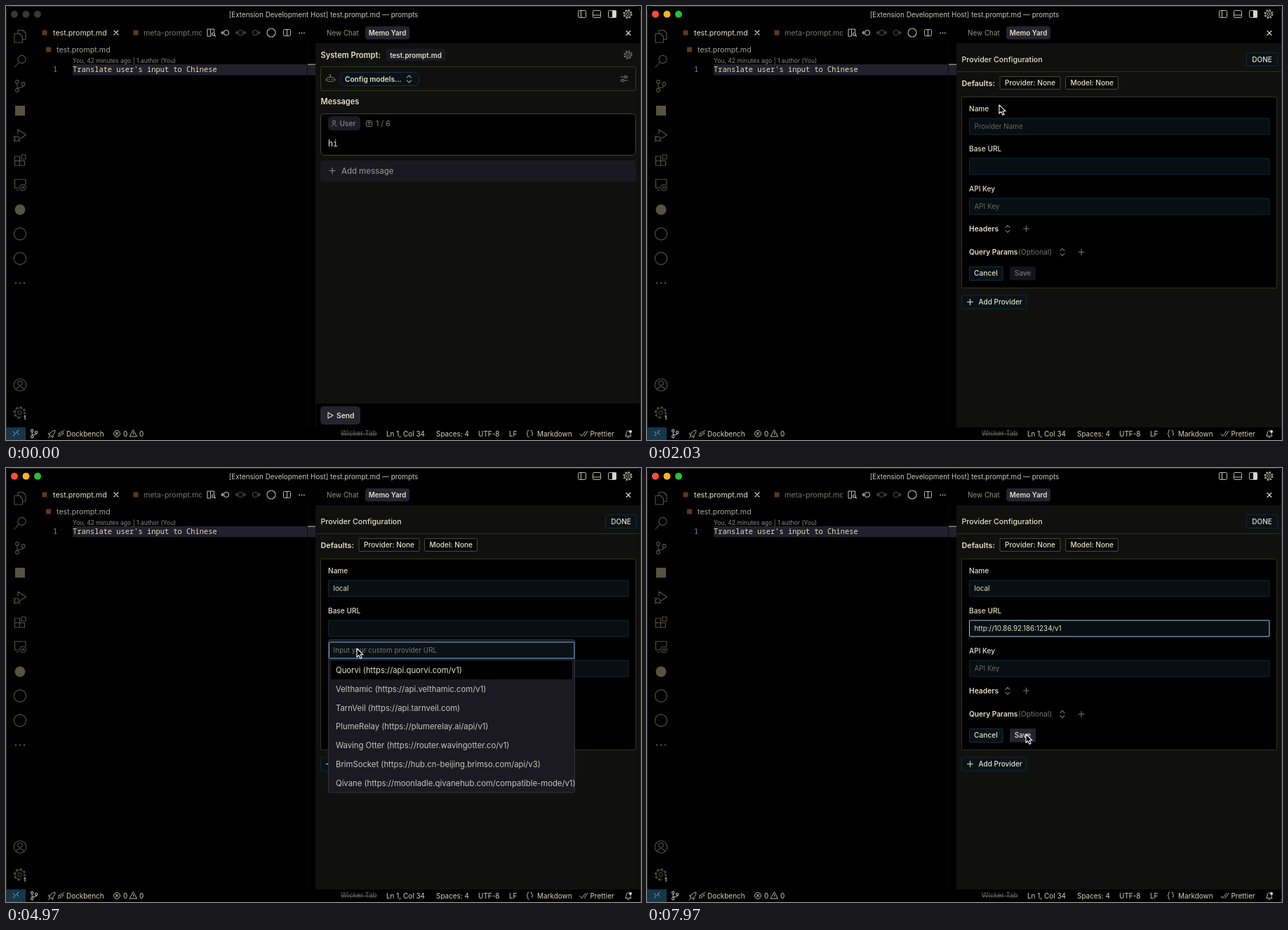
Animation, 905 px wide and 618 px high, one loop 8 s. Source, as an HTML page:

```html
<!DOCTYPE html>
<html lang="en">
<head>
<meta charset="utf-8">
<title>Prompt editor</title>
<style>
  html, body { margin: 0; width: 100%; height: 100%; overflow: hidden; background: #000; }
  svg { display: block; width: 100%; height: 100%; }
  text { font-family: Inter, "Open Sans", sans-serif; white-space: pre; }
  .mono { font-family: "Noto Sans Mono", "DejaVu Sans Mono", monospace; }
</style>
</head>
<body>
<svg id="stage" viewBox="0 0 905 618" xmlns="http://www.w3.org/2000/svg"></svg>
<script>
const LOOP = 8000;
const INK = '#e2e0c4', SOFT = '#b9b8a8', DIM = '#77766b', ICON = '#55543f';
const BLUE = '#6fa8e2', PALE = '#a8c6de', EDGE = '#122936', FIELD = '#070f13', CHIP = '#25242f';

// Drawing helpers; text is placed by the vertical centre of its line.
const text = (x, y, s, size = 10, fill = INK, weight = 400, extra = '') =>
  `<text x="${x}" y="${y + size * 0.36}" font-size="${size}" fill="${fill}" font-weight="${weight}" ${extra}>${s}</text>`;
const mid = (x, y, s, size, fill, weight) => text(x, y, s, size, fill, weight, 'text-anchor="middle"');
const rect = (x, y, w, h, fill, stroke = 'none', r = 0, extra = '') =>
  `<rect x="${x}" y="${y}" width="${w}" height="${h}" rx="${r}" fill="${fill}" stroke="${stroke}" ${extra}/>`;
const box = (x, y, w, h, fill, stroke, r = 1, extra = '') =>
  rect(x + 0.5, y + 0.5, w - 1, h - 1, fill, stroke, r, extra);
const path = (d, stroke = ICON, width = 1.1, fill = 'none', extra = '') =>
  `<path d="${d}" stroke="${stroke}" stroke-width="${width}" fill="${fill}" stroke-linecap="round" stroke-linejoin="round" ${extra}/>`;
const ring = (x, y, r, stroke = ICON, width = 1.1, extra = '') =>
  `<circle cx="${x}" cy="${y}" r="${r}" fill="none" stroke="${stroke}" stroke-width="${width}" ${extra}/>`;
const disc = (x, y, r, fill, extra = '') => `<circle cx="${x}" cy="${y}" r="${r}" fill="${fill}" ${extra}/>`;
const group = (id, body) => `<g id="${id}">${body}</g>`;
const plus = (x, y, r, color = INK) => path(`M${x - r} ${y}h${2 * r}M${x} ${y - r}v${2 * r}`, color);
const cross = (x, y, r, color = INK) =>
  path(`M${x - r} ${y - r}l${2 * r} ${2 * r}M${x + r} ${y - r}l${-2 * r} ${2 * r}`, color);
const dots = (x, y, gap, r, color) => [-gap, 0, gap].map(d => disc(x + d, y, r, color)).join('');
const chevrons = (x, y, color) => path(`M${x - 3} ${y - 2}l3 -3l3 3M${x - 3} ${y + 2}l3 3l3 -3`, color);
const gear = (x, y, r, color) =>
  ring(x, y, r, color, 1.8, `stroke-dasharray="${r * 0.393} ${r * 0.393}"`) +
  ring(x, y, r - 1.3, color, 1) + ring(x, y, r * 0.35, color, 1);
const branch = (x, y, s, color) =>
  ring(x - 4 * s, y - 6 * s, 2.4 * s, color) + ring(x - 4 * s, y + 6 * s, 2.4 * s, color) +
  ring(x + 4.5 * s, y - 3 * s, 2.4 * s, color) +
  path(`M${x - 4 * s} ${y - 3.5 * s}v${7 * s}M${x + 4.5 * s} ${y - 0.5 * s}q0 ${3 * s} ${-8 * s} ${3 * s}`, color);

function titleBar() {
  const lights = [12, 28.5, 45];
  const colors = ['#ff4b40', '#ffb224', '#24c138'];
  return group('lightsOff', lights.map(x => disc(x, 11.7, 5, '#383835')).join('')) +
    group('lightsOn', lights.map((x, i) => disc(x, 11.7, 5, colors[i])).join('')) +
    mid(452.5, 12, '[Extension Development Host] test.prompt.md — prompts', 9.9, '#c9c8bc') +
    box(815, 6, 12, 11, 'none', SOFT) + path('M819.5 6.5v10', SOFT) +
    box(836, 6, 12, 11, 'none', SOFT) + path('M836.5 13h11', SOFT) +
    box(858, 6, 12, 11, 'none', SOFT) + rect(864, 6.5, 5.5, 10, '#d8d7c8') +
    gear(886, 11.5, 5.6, SOFT);
}

function activityBar() {
  return path('M17 39v-4.5h7l4 4v9h-4M12 39.5h7.5l4 4v8.5h-11.5z') +
    ring(22.5, 76, 5.6) + path('M18.5 80l-6.5 7') +
    branch(20, 114, 1) +
    rect(13, 142, 14, 14, ICON) +
    path('M17 182v-6l11.5 7.5l-8.5 5.5M11 185l2 1.5M11 189h1.5M11 193l2-1.5M20 193l-2-1.5') + ring(15.5, 189, 3.3) +
    path('M12.5 214h7v13h-7zM12.5 220.5h14v6.5h-7M22 212h6v6h-6z') +
    path('M18 259h-5.5v-12h15.5v7M15 262h3') + ring(24, 258.5, 4.3) + path('M22.5 257l1.5 1.5l-1.5 1.5M25.5 257v3') +
    disc(20, 290, 7.5, ICON) + ring(20, 324.5, 8.6) + ring(20, 359.5, 8.6) +
    dots(20, 394.5, 6, 1.2, ICON) +
    ring(20, 539.5, 8.8) + ring(20, 537, 3.2) + path('M14 546q6 -8 12 0') +
    gear(19.5, 579, 7.8, ICON) + disc(26.5, 586, 5, '#000') + mid(26.5, 586, '1', 7.5, INK, 600);
}

function editor() {
  const md = (x, y) => rect(x - 3.5, y - 3.5, 7, 7, '#5b3a1e');
  const nav = (x, color, left, right) => ring(x, 38, 3.5, color) +
    (left ? path(`M${x - 3.5} 38h-3.5m2 -2l-2 2l2 2`, color) : '') +
    (right ? path(`M${x + 3.5} 38h3.5m-2 -2l2 2l-2 2`, color) : '');
  return md(55, 38) + text(67, 38, 'test.prompt.md', 10.65, INK) + cross(157, 38, 3) +
    md(185, 38) +
    '<clipPath id="tabClip"><rect x="190" y="28" width="89" height="20"/></clipPath>' +
    `<g clip-path="url(#tabClip)">${text(196, 38, 'meta-prompt.md', 10.65, DIM)}</g>` +
    path('M291.5 33h-4.5v10h4.5zM291.5 33h5v4', SOFT) + ring(295.5, 40, 2, SOFT) + path('M297 41.5l1.5 1.5', SOFT) +
    nav(314, SOFT, true, false) + nav(334.5, '#4b4b43', true, true) + nav(355, '#4b4b43', false, true) +
    ring(378, 38, 6, SOFT) + box(395, 33, 11, 10, 'none', SOFT) + path('M400.5 33.5v9', SOFT) +
    dots(421.5, 38.5, 3.3, 0.9, SOFT) +
    md(60.5, 62) + text(72, 62, 'test.prompt.md', 10.65, '#a3a297') +
    text(95, 77.5, 'You, 42 minutes ago | 1 author (You)', 8.6, '#8c8b80') +
    rect(95, 83, 346, 15.5, '#21202c') + rect(429, 53, 1, 547, '#0b0b0a') + rect(430, 82.5, 11, 1.5, '#8a8978') +
    text(67, 90.3, '1', 10.4, '#8388b8', 400, 'class="mono"') +
    text(95, 90.3, "Translate user's input to Chinese", 10.4, '#e3dfb4', 500, 'class="mono"');
}

function statusBar() {
  const item = (x, s) => text(x, 609, s, 9.95, '#d5d3b2');
  return rect(0, 600, 905, 18, '#000') + rect(0, 600, 28, 18, '#16364a') +
    path('M10.5 606l3 3l-3 3M18 604l-3 3l3 3', '#8db4c4', 1) +
    branch(40, 609, 0.7, SOFT) +
    path('M62 612q0 -6 8 -8q0 6 -6 9zM62 608l-2 1l2 2M66 613v2l2 -3M60 615l2 -2', SOFT, 0.9) +
    path('M74 613l2 -2m0 -3l3 3q-3 3 -4 0zM78 607l3 3q2 -3 -1 -4zM81 606l2 -2', SOFT, 0.9) +
    item(86, 'Dockbench') + ring(158, 609, 4.5, SOFT, 1) + cross(158, 609, 1.8, SOFT) + item(167, '0') +
    path('M181.5 604l5 9h-10zM181.5 607.5v2.5', SOFT, 1) + item(190, '0') +
    text(477, 609, 'Wicker Tab', 9.7, '#66655a', 400, 'text-decoration="line-through"') +
    item(542, 'Ln 1, Col 34') + item(613, 'Spaces: 4') + item(673, 'UTF-8') + item(717, 'LF') +
    path('M745 604q-2 0 -1.5 2.5q0 2 -1.5 2.5q1.5 .5 1.5 2.5q-.5 2.5 1.5 2.5M748 604q2 0 1.5 2.5q0 2 1.5 2.5q-1.5 .5 -1.5 2.5', SOFT, 1) +
    item(757, 'Markdown') + path('M818 609.5l2.5 3l5.5 -7M823.5 612l.5 .5l5 -7', SOFT, 1) + item(832.5, 'Prettier') +
    path('M883 612.5h8l-1 -2v-2M888 605q-4 -1 -4 4l-1 3M886 614.5h2', SOFT, 1) + disc(890, 606, 2, INK);
}

function home() {
  return text(448.5, 70, 'System Prompt:', 11.1, INK, 600) +
    rect(542, 61, 84, 17, '#1b1a23', 'none', 3) + mid(584, 70, 'test.prompt.md', 9.85, INK, 600) +
    gear(886.5, 69.5, 5.3, DIM) +
    box(448, 86, 450, 35, '#0f100d', '#373722', 2) +
    box(457, 101, 11, 7, 'none', DIM, 2) + path('M462.5 101v-3h-2M456 104v2M469 104v2M460.5 104v1M464.5 104v1', DIM) +
    box(476, 94, 113, 20, '#091216', '#173242', 7) + text(483, 104, 'Config models...', 10.1, INK, 600) + chevrons(574.5, 104, '#8c9698') +
    path('M876 101h5M884.5 101h1.5M876 106h1.5M881 106h5', DIM) + ring(883, 101, 1.7, DIM) + ring(879, 106, 1.7, DIM) +
    text(448.5, 136, 'Messages', 11.1, INK, 600) +
    box(448, 153, 450, 60, '#000', '#424234', 5) +
    rect(459, 157, 46, 20, '#1d1c26', 'none', 5) + ring(467.5, 165, 2, DIM) + path('M464 171q3.5 -5 7 0', DIM) +
    text(475.5, 167, 'User', 10.2, '#88877b', 500) +
    box(513, 163, 9, 9, 'none', DIM, 1) + path('M515.5 165.5h4M517.5 165.5v4', DIM) + text(527, 167.5, '1 / 6', 10.7, '#88877b') +
    text(459, 195.5, 'hi', 11.7, INK, 500, 'class="mono"') +
    rect(448, 220, 450, 30, '#1a1922', 'none', 4) + plus(465, 234.5, 4, '#8b8a80') + text(478, 234.5, 'Add message', 11.4, '#8b8a80', 500) +
    rect(442, 566, 462, 34, '#000') +
    rect(448, 570, 57, 26, CHIP, 'none', 5) + path('M459 579l7 4l-7 4z', INK) + text(471, 583, 'Send', 10.3, INK, 600);
}

const addProvider = y => box(448, y - 10, 93, 20, '#091217', EDGE, 1) +
  plus(460.5, y, 4) + text(472.5, y, 'Add Provider', 10, INK, 500);

function config() {
  return text(448.5, 76.5, 'Provider Configuration', 10.65, INK, 500) +
    box(854, 66, 45, 20, '#081218', EDGE) + mid(876.5, 76.5, 'DONE', 10.1, INK, 500) +
    rect(442, 93, 463, 1, '#303019') +
    text(448.5, 110, 'Defaults:', 10.9, INK, 600) +
    box(502.5, 100, 87, 19, '#080807', '#484838') + mid(546, 109.7, 'Provider: None', 10.1, INK, 500) +
    box(596, 100, 76, 19, '#080807', '#484838') + mid(634.3, 109.7, 'Model: None', 10.1, INK, 500);
}

function form() {
  const field = (y, id) => box(459, y, 428.5, 24, FIELD, EDGE, 1, `id="${id}"`);
  const label = (y, s) => text(459, y, s, 10.1, INK, 500);
  return box(448, 129, 450, 273, '#000', '#333322', 2) +
    label(146.5, 'Name') + field(159.5, 'nameBox') + text(466.5, 171.5, '', 9.9, INK, 400, 'id="nameText"') +
    label(203.5, 'Base URL') + field(216.5, 'urlBox') + text(466.5, 228.5, '', 9.85, INK, 400, 'id="urlText"') +
    label(260.5, 'API Key') + field(273.5, 'keyBox') + text(466.5, 285.5, 'API Key', 9.9, '#66675f') +
    text(459, 317.3, 'Headers', 10.3, INK, 600) + chevrons(514, 317.3, DIM) + plus(540.5, 317, 4, DIM) +
    text(459, 350.7, 'Query Params', 10.15, INK, 600) + text(529, 350.7, '(Optional)', 10.3, DIM) +
    chevrons(592, 350.7, DIM) + plus(619, 350.5, 4, DIM) +
    box(459, 371, 48.5, 20, '#081116', '#17313f') + mid(483, 380.7, 'Cancel', 10.2, INK, 500) +
    rect(517, 371, 37, 19.5, '#151419', 'none', 1, 'id="saveBox"') +
    text(535.5, 380.7, 'Save', 9.95, DIM, 500, 'id="saveText" text-anchor="middle"') +
    addProvider(421.5);
}

function popover() {
  const items = [
    'Quorvi (https://api.quorvi.com/v1)',
    'Velthamic (https://api.velthamic.com/v1)',
    'TarnVeil (https://api.tarnveil.com)',
    'PlumeRelay (https://plumerelay.ai/api/v1)',
    'Waving Otter (https://router.wavingotter.co/v1)',
    'BrimSocket (https://hub.cn-beijing.brimso.com/api/v3)',
    'Qivane (https://moonladle.qivanehub.com/compatible-mode/v1)'
  ];
  return box(459, 244, 352, 218.5, '#1b1a22', '#35343d', 2) +
    box(460, 247.5, 350.5, 24, '#0b1216', BLUE, 1) +
    text(466.5, 259.5, '', 9.85, DIM, 400, 'id="customText"') +
    rect(463, 274.5, 344, 26.5, '#000') +
    items.map((s, i) => text(470, 288 + i * 26.75, s, 11.3, i ? '#c5c4b8' : INK)).join('');
}

const arrow = 'M0 0v12.3l2.9 -2.7l2 4.6l2.2 -.9l-2 -4.5h4z';

document.getElementById('stage').innerHTML =
  rect(0, 0, 905, 618, '#000') + rect(441, 53, 464, 547, '#10110e') +
  titleBar() + activityBar() + editor() +
  text(457, 38, 'New Chat', 9.9, '#92917f') + rect(512, 29, 63, 18.5, CHIP, 'none', 4) +
  mid(543.5, 38, 'Memo Yard', 9.8, INK, 600) + cross(887, 38.5, 3) +
  group('home', home()) + group('config', config()) + group('adder', addProvider(139)) +
  group('form', form()) + group('popover', popover()) + statusBar() +
  rect(0.5, 0.5, 904, 625, 'none', '#34342b', 8, 'stroke-opacity=".8"') +
  group('pointer', path(arrow, '#fff', 1.1, '#000'));

const el = id => document.getElementById(id);
const show = (id, on) => el(id).setAttribute('display', on ? 'inline' : 'none');
const paint = (id, attr, value) => el(id).setAttribute(attr, value);
const write = (id, s, fill) => { el(id).textContent = s; paint(id, 'fill', fill); };
const clamp = v => Math.max(0, Math.min(1, v));
const ease = v => v * v * (3 - 2 * v);

// Pointer stops: time, x, y
const stops = [
  [350, 700, 330], [800, 567, 104], [1100, 567, 105], [1450, 567, 115], [1600, 567, 115],
  [1820, 502, 140], [1980, 502, 140], [2450, 500, 168], [3680, 500, 168], [4080, 493, 227],
  [4550, 493, 228], [4920, 500, 257], [6080, 500, 257], [6480, 622, 223], [6900, 622, 223], [7650, 540, 379]
];

function pointerAt(t) {
  const i = stops.findIndex(s => s[0] > t);
  if (i < 0) return stops[stops.length - 1].slice(1);
  if (i === 0) return stops[0].slice(1);
  const [a, b] = [stops[i - 1], stops[i]];
  const k = ease((t - a[0]) / (b[0] - a[0]));
  return [a[1] + (b[1] - a[1]) * k, a[2] + (b[2] - a[2]) * k];
}

const URL_TEXT = 'http://10.86.92.186:1234/v1';
const T = { active: 820, config: 960, form: 1920, name: 2400, type: 3050, url: 4120, open: 4600, paste: 5780, close: 6420 };

function draw(t) {
  show('lightsOff', t < T.active);
  show('lightsOn', t >= T.active);
  show('home', t < T.config);
  show('config', t >= T.config);
  show('adder', t >= T.config && t < T.form);
  show('form', t >= T.form);

  const typed = 'local'.slice(0, Math.max(0, Math.floor((t - T.type) / 110) + 1));
  write('nameText', typed || 'Provider Name', typed ? INK : '#66675f');
  const saved = t >= T.close;
  write('urlText', saved ? URL_TEXT : '', INK);
  paint('nameBox', 'stroke', t >= T.name && t < T.url ? BLUE : EDGE);
  paint('urlBox', 'stroke', (t >= T.url && t < T.open) || saved ? PALE : EDGE);
  paint('saveBox', 'fill', saved ? CHIP : '#151419');
  paint('saveText', 'fill', saved ? INK : DIM);

  const level = clamp((t - T.open) / 120) * (1 - clamp((t - T.close) / 160));
  show('popover', level > 0);
  paint('popover', 'opacity', level);
  paint('popover', 'transform', `translate(459 244) scale(${0.95 + 0.05 * level}) translate(-459 -244)`);
  const pasted = t >= T.paste;
  write('customText', pasted ? URL_TEXT : 'Input your custom provider URL', pasted ? INK : DIM);

  show('pointer', t >= stops[0][0]);
  paint('pointer', 'transform', `translate(${pointerAt(t).join(' ')})`);
}

function tick() {
  draw(performance.now() % LOOP);
  requestAnimationFrame(tick);
}
tick();
</script>
</body>
</html>
```
